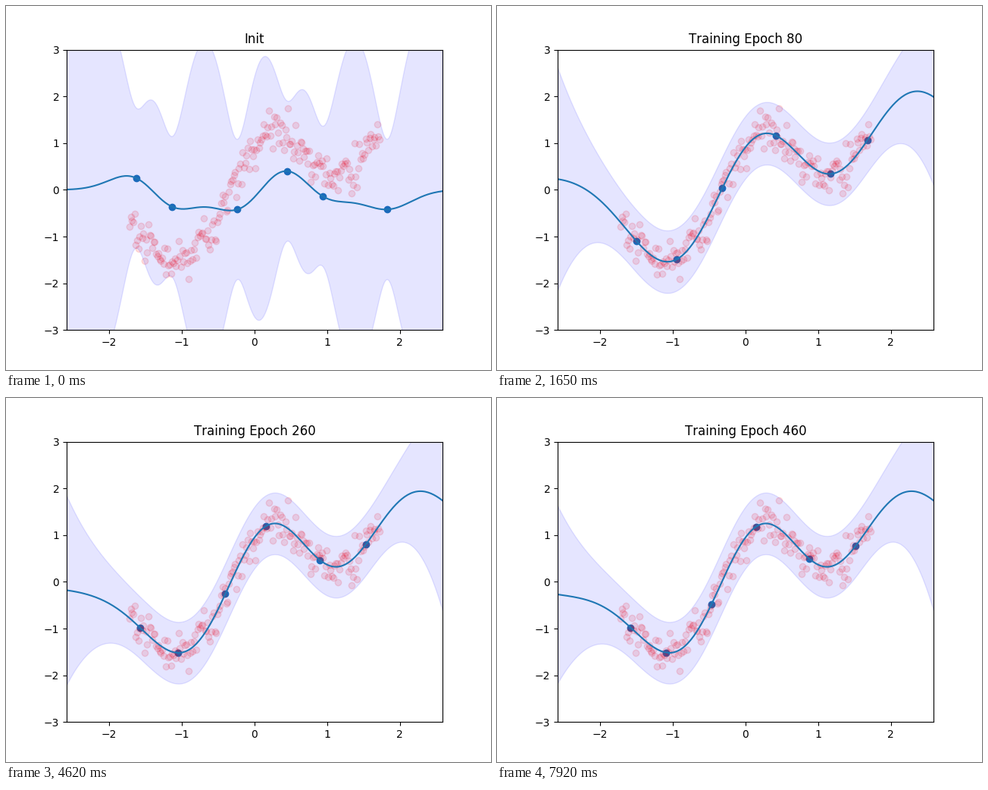
These frames come from a looping animation (640 px wide and 480 px high, 8 s). A matplotlib script:

```python
import numpy as np
import matplotlib.pyplot as plt
from matplotlib.animation import FuncAnimation

plt.rcParams["text.kerning_factor"] = 6

LOOP, TICK, HOLD = 8000, 20, 330      # ms
XMAX = 2.586
xs = np.linspace(-XMAX, XMAX, 260)


def rbf(a, b, ell):
    return np.exp(-0.5 * ((a[:, None] - b[None, :]) / ell) ** 2)


def smooth(*pts, ell=0.72):
    """Smooth curve over xs through a few (x, y) points."""
    px, py = np.array(pts).T
    k = rbf(px, px, ell) + 2e-4 * np.eye(len(px))
    return rbf(xs, px, ell) @ np.linalg.solve(k, py)


def process(z, m, ell, spread, amp):
    """Mean and band half-width of a Gaussian process tied to points z."""
    k = rbf(z, xs, ell)
    w = np.linalg.solve(rbf(z, z, ell), k)
    var = spread * np.sum(w ** 2, axis=0) + amp * (1 - np.sum(w * k, axis=0))
    return m @ w, np.sqrt(var + 0.05)


def width(base, left, right, power=2.6):
    """Band half-width: flat over the data, growing outside it."""
    return (base + left * np.clip(-xs - 1.5, 0, None) ** power
            + right * np.clip(xs - 1.5, 0, None) ** power)


early = smooth((-2.586, .39), (-1.97, -.5), (-1.19, -1.71), (-.38, -.1),
               (.38, 1.2), (1.45, .55), (2.0, .81), (2.586, 1.05))
middle = smooth((-2.586, .23), (-2, -.23), (-1.5, -1.1), (-1.07, -1.54),
                (-.32, .04), (.3, 1.21), (1.17, .34), (1.68, 1.07),
                (2.36, 2.11), (2.586, 1.99))
final = smooth((-2.586, -.27), (-2, -.5), (-1.58, -.98), (-1.04, -1.52),
               (-.32, .02), (.27, 1.25), (1.12, .32), (1.515, .77),
               (2.28, 1.94), (2.586, 1.74))
late = final + 0.2 * np.exp(-((xs + XMAX) / 0.6) ** 2)

# start, and the same after one small training step
z0 = np.array([-1.627, -1.137, -0.235, 0.45, 0.94, 1.825])
m0 = np.array([0.25, -0.36, -0.42, 0.40, -0.14, -0.42])
z_early = np.array([-1.97, -0.85, -0.38, 0.33, 1.36, 2.37])
RATE = 0.08
z1 = z0 + RATE * np.sign(z_early - z0)
m1 = m0 + RATE * np.sign(np.interp(z0, xs, early) - m0)


def key(z, mean, half):
    return np.concatenate([z, mean, half])


STEPS = [0, 1, 2, 5, 7, 24]
KEYS = [
    key(z0, *process(z0, m0, 0.33, 2.2, 17.2)),
    key(z1, *process(z1, m1, 0.33 * (1 + RATE), 2.0, 15.8)),
    key(z_early, early, width(.58, .50, .05, 5)),
    key([-1.505, -.945, -.32, .42, 1.17, 1.68], middle, width(.67, 1.38, .99)),
    key([-1.57, -.985, -.32, .175, .92, 1.545], late, width(.66, 1.22, 1.37)),
    key([-1.58, -1.10, -.47, .145, .88, 1.515], final, width(.66, 1.0, 1.37)),
]


def state(step):
    """Dots, mean and half-width, easing out from key to key."""
    i = min(np.searchsorted(STEPS, step, "right"), len(STEPS) - 1)
    t = (step - STEPS[i - 1]) / (STEPS[i] - STEPS[i - 1])
    w = 1 - (1 - t) ** 1.5
    return np.split((1 - w) * KEYS[i - 1] + w * KEYS[i], [6, 6 + len(xs)])


rng = np.random.default_rng(12)
data_x = np.linspace(-1.72, 1.72, 200)
data_y = np.interp(data_x, xs, final) + rng.normal(0, 0.23, data_x.size)

fig, ax = plt.subplots(figsize=(6.4, 4.8), dpi=100)
ax.set_xlim(-XMAX, XMAX)
ax.set_ylim(-3, 3)
title = ax.set_title("Init")
dots = ax.scatter(z0, m0, color="C0", zorder=1)
ax.scatter(data_x, data_y, color="red", alpha=0.12, zorder=1.1)
band = ax.fill_between(xs, xs, xs, color="blue", alpha=0.1, zorder=1.2)
line, = ax.plot(xs, xs, color="C0", zorder=2)


def draw(n):
    step = (n * TICK + TICK - 1) // HOLD
    z, mean, half = state(step)
    line.set_ydata(mean)
    dots.set_offsets(np.column_stack([z, np.interp(z, xs, mean)]))
    top = np.column_stack([xs, mean + half])
    low = np.column_stack([xs, mean - half])
    band.set_verts([np.vstack([top, low[::-1]])])
    title.set_text(f"Training Epoch {20 * (step - 1)}" if step else "Init")
    return line, dots, band, title


anim = FuncAnimation(fig, draw, frames=LOOP // TICK, interval=TICK,
                     repeat=True, repeat_delay=0, cache_frame_data=False)
plt.show()
```
